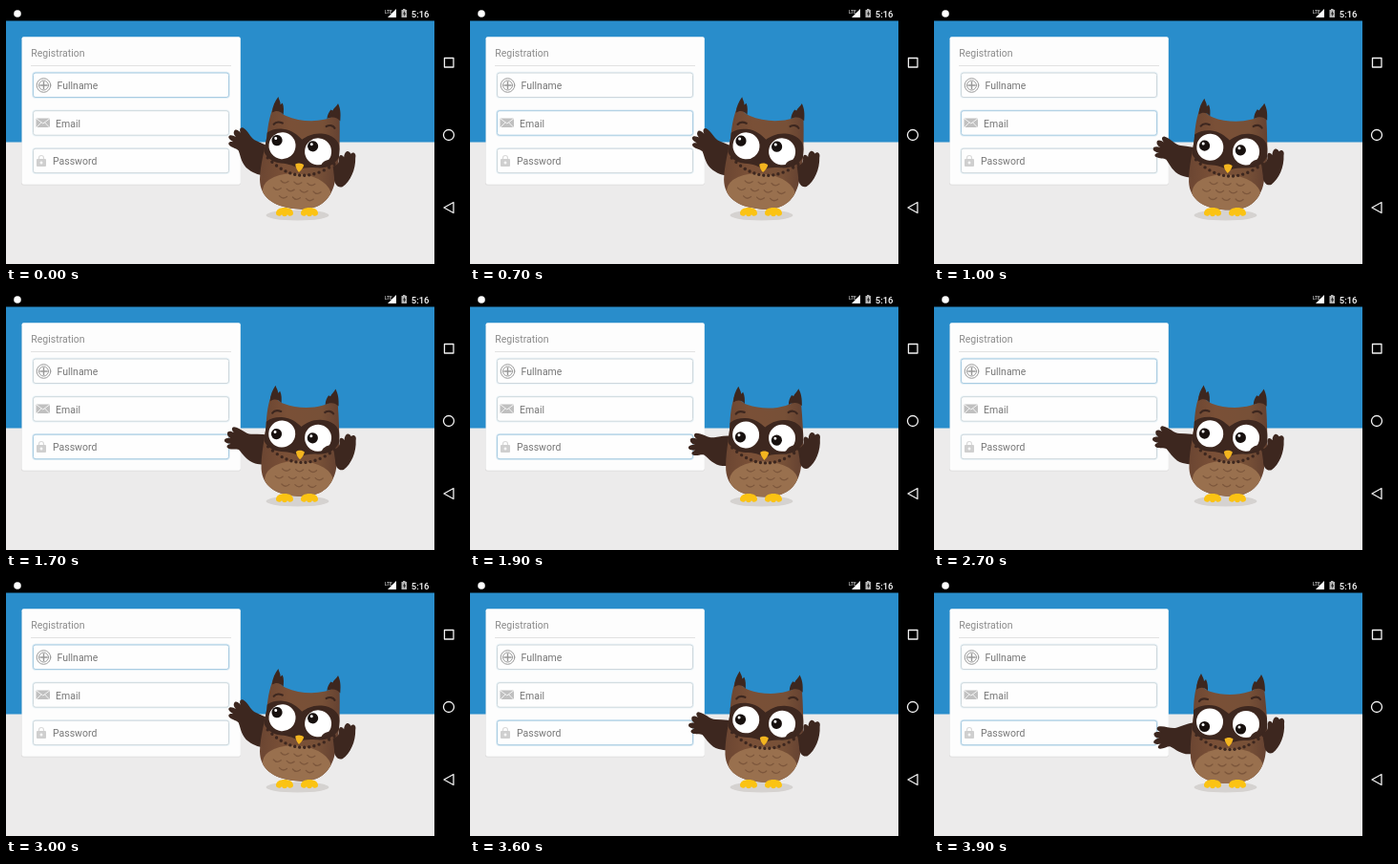
An HTML page that plays this animation: 480x270 px, repeating every 4 s.

```html
<!DOCTYPE html>
<html lang="en">
<head>
<meta charset="utf-8">
<title>Registration owl</title>
<style>
  html, body { margin: 0; width: 100%; height: 100%; overflow: hidden; background: #000; }
  svg { display: block; width: 100%; height: 100%; font-family: Roboto, sans-serif; }
  .field rect { fill: #fefefe; stroke: #cdd7dc; stroke-width: 1; }
  .field .glow { fill: none; stroke: #b9d9ec; stroke-width: 2.5; opacity: .25; }
  .field.focus .glow { opacity: .5; }
  .field.focus .box { stroke: #a9cce2; }
  .field text { font-size: 10.5px; fill: #777; }
  .dark { fill: #3d271f; }
  .line { fill: none; stroke-linecap: round; stroke-linejoin: round; }
</style>
</head>
<body>
<svg viewBox="0 0 480 270">
  <defs>
    <linearGradient id="fur">
      <stop offset="0" stop-color="#6c4632"/>
      <stop offset=".3" stop-color="#7a5037"/>
      <stop offset=".75" stop-color="#775037"/>
      <stop offset="1" stop-color="#644131"/>
    </linearGradient>
    <clipPath id="bodyClip"><use href="#body"/></clipPath>
    <path id="foot" d="M-9 2C-9-2-5-4 0-4S9-2 9 2C9 5 4 6 3 3C2 6-2 6-3 3C-4 6-9 5-9 2Z" fill="#fbc313"/>
  </defs>

  <rect y="15.500" width="449" height="127.500" fill="#298dcb"/>
  <rect y="142.500" width="449" height="127.500" fill="#ecebeb"/>

  <!-- status and navigation bars -->
  <circle cx="12" cy="8" r="3.8" fill="#fff"/>
  <g fill="#fff">
    <text x="397" y="8" font-size="5">LTE</text>
    <path d="M409 3V12H400Z"/>
    <path d="M414.500 4h1.500v-1h2.500v1h1.500v8h-5.500z" fill="#b5b5b5"/>
    <path d="M418 5l-2 3.500h1.200v2.500l2-3.500h-1.200z" fill="#222"/>
    <text x="424.800" y="11.700" font-size="9.5" font-weight="500">5:16</text>
  </g>
  <g class="line" stroke="#f2f2f2" stroke-width="1.3">
    <rect x="459.500" y="54.500" width="9.500" height="9.500"/>
    <circle cx="464" cy="135" r="5.500"/>
    <path d="M459 211L469 205.500V216.500Z"/>
  </g>

  <!-- form -->
  <rect x="16" y="33" width="230" height="154.500" rx="2" fill="#000" opacity=".07"/>
  <rect x="16.500" y="32.300" width="229.300" height="154.500" rx="2" fill="#fdfdfd"/>
  <text x="26.300" y="53.300" font-size="10.5" fill="#8a8a8a">Registration</text>
  <path d="M26 62.500H236" stroke="#e2e2e2"/>
  <g id="fields"></g>
  <g class="line" stroke="#999" stroke-width="1">
    <circle cx="39.500" cy="83" r="7.300"/>
    <circle cx="39.500" cy="83" r="5"/>
    <path d="M39.500 79.500v7M36 83h7" stroke-width="1.500"/>
  </g>
  <rect x="31.500" y="117.500" width="14.500" height="9.500" rx="1" fill="#c0c0c0"/>
  <path class="line" d="M32 118l6.800 5l6.800-5M32 127l4.800-5M45.500 127l-4.800-5" stroke="#f4f4f4"/>
  <path class="line" d="M34.500 160v-1a2.500 2.500 0 0 1 5 0v1" stroke="#dadada" stroke-width="1.200"/>
  <rect x="32" y="160" width="10" height="8" rx="1" fill="#cfcfcf"/>
  <path d="M37 162.500v3M35.500 164h3" stroke="#fff" stroke-width="1.200"/>

  <!-- owl -->
  <ellipse cx="305.500" cy="219" rx="33" ry="5.500" fill="#d5d2d0"/>
  <g id="leftWing">
    <path class="dark" d="M10-9C0-10-8-9-16-8C-22-7-28-13-35-13C-38-12-37-9-34-7C-38-9-42-8-41-5C-41-3-38-1-36-1C-40-1-44 0-43 3C-42 5-38 5-36 5C-40 6-41 9-38 10C-34 11-30 9-27 10C-22 14-17 21-8 22C0 23 6 21 10 19Z"/>
  </g>
  <g id="torso">
    <path id="body" d="M277 108C280 113 284 117 290 119C302 123 318 123 330 119C337 117 341 113 345 109C347 121 348 135 349 148C350 161 349 174 347 187C343 206 331 215 309 215C285 215 271 206 269 188C268 172 271 158 272 143C272 130 273 118 277 108Z" fill="url(#fur)"/>
    <path class="dark" d="M275 117C275 110 277 105 280 100C281 103 283 105 283 108L285 106C287 110 287 114 287 118C283 114 279 114 275 117ZM347 119C347 111 346 106 343 101C342 104 339 106 338 109L336 108C334 111 333 114 333 118C338 115 343 115 347 119Z"/>
    <g clip-path="url(#bodyClip)">
      <ellipse cx="309" cy="198" rx="36" ry="20" fill="#99704e"/>
      <g id="feathers" class="line" stroke="#7d573c" stroke-width="1.300"></g>
      <path class="dark" d="M268 150C267 139 276 133 288 133C298 133 304 138 309 142C314 138 320 134 329 134C341 134 350 140 350 153C349 164 338 170 327 170C319 170 314 171 309 174C304 170 298 169 289 169C277 169 269 161 268 150Z"/>
    </g>
    <g id="collar" class="dark"></g>
    <path class="line" d="M278 129C280 126 284 126 287 127M333 126C336 124 340 124 342 127" stroke="#3d271f" stroke-width="2.200"/>
    <circle cx="289" cy="150.500" r="14" fill="#fff"/>
    <circle cx="327" cy="153" r="14" fill="#fff"/>
    <path class="dark" d="M331 168C332 163 337 160 342 160L341 168Z"/>
    <g id="pupils">
      <g id="pupil"><circle r="5.600" fill="#17100e"/><circle cx="-1.500" cy="-2" r="1.500" fill="#fff"/></g>
      <use href="#pupil" x="38" y="2.500"/>
    </g>
    <path d="M304.500 168.500C307 166.500 311 166.500 313.500 168.500C313 172 310.500 175 309 176.500C307 174.500 305 172 304.500 168.500Z" fill="#f3b51f"/>
  </g>
  <g id="rightWing">
    <path class="dark" d="M344 162C348 161 350 159 350 155C349 150 352 148 355 152C355 146 359 143 362 148C365 145 368 148 367 152C368 164 363 177 355 183C350 185 346 180 346 174Z"/>
  </g>
  <use href="#foot" x="292" y="215"/>
  <use href="#foot" x="318" y="215"/>
</svg>
<script>
const $ = id => document.getElementById(id);
const LOOP = 4000, STEP = 100, STEPS = 6;
// Pose 0 looks at the first field, 1 at the last.
const moves = [
  { at: 700, from: 0, to: .5, field: 1 },
  { at: 1700, from: .5, to: 1, field: 2 },
  { at: 2500, from: 1, to: 0, field: 0 },
  { at: 3400, from: 0, to: 1, field: 2 }
];

$('fields').innerHTML = [['Fullname', 53.5, 70], ['Email', 52, 109.7], ['Password', 49, 149.2]]
  .map(([label, x, y]) => {
    const rect = name => `<rect class="${name}" x="28.500" y="${y}" width="205" height="25.500" rx="2.500"/>`;
    return `<g class="field">${rect('glow')}${rect('box')}<text x="${x}" y="${y + 17}">${label}</text></g>`;
  }).join('');
const fields = [...document.querySelectorAll('.field')];

$('collar').innerHTML = Array.from({ length: 15 }, (_, i) => {
  const u = i / 7 - 1;
  return `<circle cx="${310 + 35 * u}" cy="${179.5 - 15 * u * u}" r="1.700"/>`;
}).join('');

$('feathers').innerHTML = [[187, 3], [195, 4], [203, 3]].map(([y, count]) =>
  Array.from({ length: count }, (_, i) =>
    `<path d="M${305 + (i - (count - 1) / 2) * 14} ${y}q4 4 8 0"/>`).join('')).join('');

const ease = u => u * u * (3 - 2 * u);
const mix = (a, b, u) => a + (b - a) * u;

function draw(time) {
  const t = time % LOOP;
  const move = moves.filter(m => m.at <= t).pop();
  let pose = 0, focus = 0;
  if (move) {
    const step = Math.min(STEPS, Math.floor((t - move.at) / STEP) + 1);
    pose = mix(move.from, move.to, ease(step / STEPS));
    focus = move.field;
  }
  const lift = 1 - pose;
  fields.forEach((f, i) => f.classList.toggle('focus', i === focus));
  $('torso').setAttribute('transform', `translate(0 ${-2.5 * lift}) rotate(${5.5 * lift} 308 155)`);
  $('leftWing').setAttribute('transform', `translate(272 ${mix(156, 161, pose)}) rotate(${mix(30, -12, pose)})`);
  $('rightWing').setAttribute('transform', `translate(${-2 * lift} ${6 * lift}) rotate(${3 * lift} 350 175)`);
  $('pupils').setAttribute('transform', `translate(${mix(283, 283.5, pose)} ${mix(145.5, 155.5, pose)})`);
}

const start = performance.now();
function tick() {
  draw(performance.now() - start);
  requestAnimationFrame(tick);
}
tick();
</script>
</body>
</html>
```
